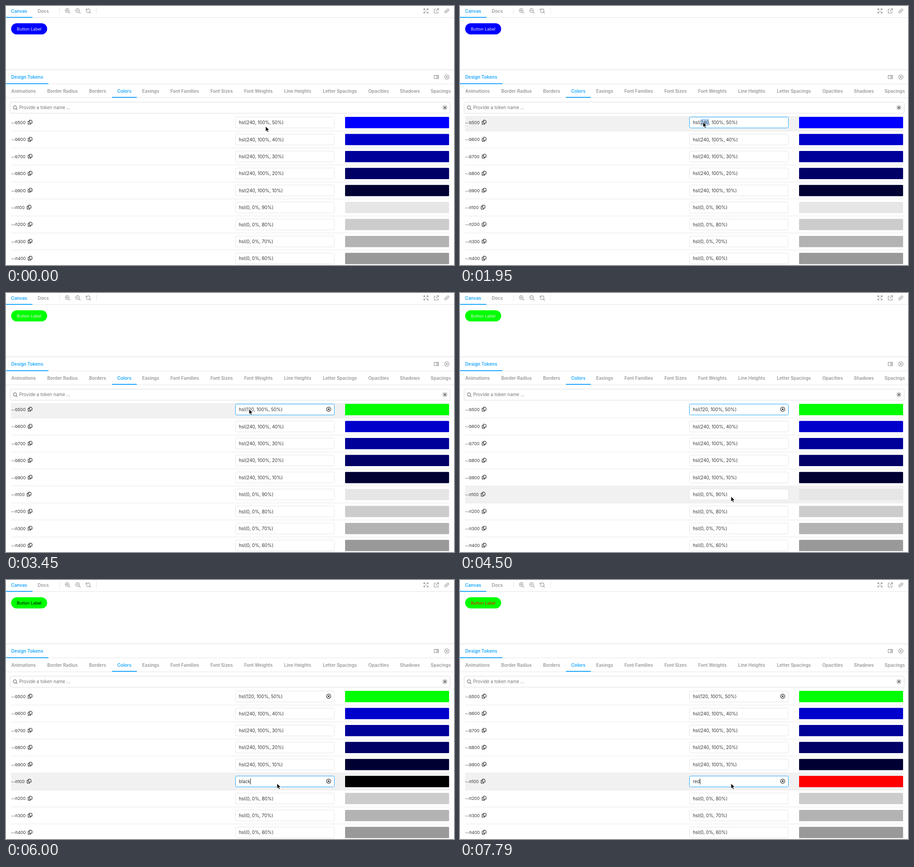
Recreate the animation shown at these times as an HTML page. Size 983 by 570 pixels, loop 8 s.

```html
<!DOCTYPE html>
<html lang="en">
<head>
<meta charset="utf-8">
<title>Design tokens</title>
<style>
html, body { margin: 0; width: 100%; height: 100%; overflow: hidden; background: #fff; }
svg { display: block; width: 983px; height: 570px; }
text { font: 9.9px Inter, "Liberation Sans", sans-serif; fill: #333; }
.tab { font-weight: 600; fill: #999; text-anchor: middle; }
.on { fill: #1ea7fd; }
.token { font-size: 9.3px; }
.label { font-size: 9.1px; text-anchor: middle; }
.icon { fill: none; stroke: #929292; stroke-width: 1.1; stroke-linecap: round; stroke-linejoin: round; }
.dark { stroke: #222; }
</style>
</head>
<body>
<svg id="stage" viewBox="0 0 983 570"></svg>
<script>
const LOOP = 8000, STEP = 150;
const ROW_H = 37.4, FIRST = 256.4, TEXT_X = 511;
const stage = document.getElementById('stage');

function add(tag, attrs, text) {
  const el = document.createElementNS('http://www.w3.org/2000/svg', tag);
  for (const k in attrs) el.setAttribute(k, attrs[k]);
  if (text !== undefined) el.textContent = text;
  stage.append(el);
  return el;
}
const rect = (x, y, width, height, fill, more) => add('rect', { x, y, width, height, fill, ...more });
const label = (x, y, str, cls) => add('text', { x, y, class: cls || '' }, str);
const icon = (x, y, d, cls = '') => add('path', { d, class: 'icon ' + cls, transform: `translate(${x} ${y})` });
const ring = r => `M${-r} 0a${r} ${r} 0 1 0 ${2 * r} 0a${r} ${r} 0 1 0 ${-2 * r} 0`;
const cross = r => `M${-r} ${-r}L${r} ${r}M${r} ${-r}L${-r} ${r}`;
const show = (el, on) => el.setAttribute('visibility', on ? 'visible' : 'hidden');
const rowY = i => FIRST + i * ROW_H;

rect(0, 0, 983, 570, '#fff');

// Toolbar
rect(0, 25, 983, 1, '#e5e5e5');
rect(0, 24, 58, 2, '#1ea7fd');
label(28.7, 14.6, 'Canvas', 'tab on');
label(81.7, 14.6, 'Docs', 'tab');
rect(117, 3, 1, 15, '#e5e5e5');
rect(198, 3, 1, 15, '#e5e5e5');
const lens = 'M-4.9 -.7a4.2 4.2 0 1 0 8.4 0a4.2 4.2 0 1 0 -8.4 0M2.4 2.4L5.2 5.2';
icon(135, 10.8, lens + 'M-2.6 -.7H1.2M-.7 -2.6V1.2');
icon(157.8, 10.8, lens + 'M-2.6 -.7H1.2');
icon(180.8, 10.8, 'M-4.4 -2.2A4.2 4.2 0 1 1 -4.7 .4M-5 -4.8V-1.8H-2M2.4 2.6L5.2 5.2');
icon(921.5, 10.8, 'M-4.7 -2V-4.7H-2M2 -4.7H4.7V-2M4.7 2V4.7H2M-2 4.7H-4.7V2' +
  'M-4.4 -4.4L-1.4 -1.4M4.4 -4.4L1.4 -1.4M4.4 4.4L1.4 1.4M-4.4 4.4L-1.4 1.4');
icon(944.3, 10.8, 'M-1 -3.8H-4.7V4.7H3.8V1M1.6 -4.9H4.9V-1.6M4.6 -4.6L-.8 .8');
icon(967.2, 10.8, 'M-1.2 1.2A2.1 2.1 0 0 1 -1.2 -1.6L1.4 -4.2A2.1 2.1 0 0 1 4.3 -1.3L2.8 .2' +
  'M1.2 -1.2A2.1 2.1 0 0 1 1.2 1.6L-1.4 4.2A2.1 2.1 0 0 1 -4.3 1.3L-2.8 -.2');

// Preview button
const button = rect(11.3, 38, 79, 24.6, '#00f', { rx: 12.3 });
const buttonText = label(50.8, 53.7, 'Button Label', 'label');

// Panel header and tabs
rect(0, 140, 983, 1, '#dcdcdc');
rect(0, 171, 983, 1, '#e5e5e5');
rect(0, 170, 93, 2, '#1ea7fd');
label(46.5, 160.2, 'Design Tokens', 'tab on');
icon(944.3, 156.3, 'M-4.8 -3.7H4.8V3.7H-4.8ZM1.2 -3.7V3.7M2.8 -1.8H3.4M2.8 0H3.4M2.8 1.8H3.4');
icon(967.2, 156.3, ring(5) + cross(1.9));
rect(0, 201.5, 983, 1, '#e5e5e5');
rect(232.5, 200, 54.5, 2, '#1ea7fd');
[['Animations', 38.5], ['Border Radius', 124], ['Borders', 201], ['Colors', 259.5],
 ['Easings', 317.5], ['Font Families', 392.2], ['Font Sizes', 473], ['Font Weights', 553.8],
 ['Line Heights', 640], ['Letter Spacings', 732.6], ['Opacities', 817.5], ['Shadows', 886.2],
 ['Spacings', 954]].forEach(([name, x]) =>
  label(x, 191, name, name === 'Colors' ? 'tab on' : 'tab'));

// Search
rect(9, 211.5, 965.5, 24.5, '#fff', { rx: 3, stroke: '#dcdcdc' });
icon(20.3, 223.8, 'M-4.3 -.6a3.6 3.6 0 1 0 7.2 0a3.6 3.6 0 1 0 -7.2 0M2 2L4.4 4.4').style.stroke = '#666';
label(29, 227.4, 'Provide a token name …').style.fill = '#777';
add('circle', { cx: 963, cy: 223.6, r: 6, fill: '#dedede' });
icon(963, 223.6, cross(2.5)).style.stroke = '#444';

// Token rows
const tokens = [];
for (let n = 5; n <= 9; n++) tokens.push(['--b' + n + '00', `hsl(240, 100%, ${100 - n * 10}%)`]);
for (let n = 1; n <= 4; n++) tokens.push(['--n' + n + '00', `hsl(0, 0%, ${100 - n * 10}%)`]);

const rows = tokens.map(([name, value], i) => {
  const y = rowY(i);
  const top = Math.max(242, y - 18.7);
  const hover = rect(11, top, 962, y + 18.7 - top, '#f1f1f1');
  rect(11, y + 18.2, 962, 1, '#e8e8e8');
  label(11.6, y + 3.5, name, 'token');
  icon(name === '--n100' ? 50.6 : 52.8, y - .6,
    'M-1.2 -4.4H2.4L4.4 -2.4V2H-1.2ZM-1.2 -2.2H-4.2V4.4H1.4V2', 'dark');
  const box = rect(503.5, y - 12, 217, 24, '#fff', { rx: 3 });
  const mark = rect(TEXT_X, y - 8.5, 0, 16, '#b3d7ff');
  const text = label(TEXT_X, y + 3.8, value);
  const caret = rect(TEXT_X, y - 6.5, 1, 13, '#222');
  const clear = icon(708, y - .6, ring(4.7) + cross(1.7), 'dark');
  const swatch = rect(744, y - 12.3, 228.2, 24.8, value, { rx: 1.5 });
  return { hover, box, mark, text, caret, clear, swatch };
});

const cursor = add('path', {
  d: 'M0 0V11.4L2.6 9L4.3 13L6.4 12.1L4.7 8.2H8.3Z',
  fill: '#000', stroke: '#fff', 'stroke-width': .9, 'stroke-linejoin': 'round'
});

// Timelines: [start, value]
const hueText = [[0, '240'], [2550, '1'], [2700, '12'], [2850, '120']];
const greyText = [[0, tokens[5][1]], [5400, 'b'], [5550, 'bl'], [5700, 'bla'], [5850, 'blac'],
  [6000, 'black'], [7190, ''], [7490, 're'], [7790, 'red']];
const focusRow = [[0, -1], [1350, 0], [4650, 5]];
const caretOn = [[0, 0], [1350, 1], [1800, 0], [2550, 1], [3450, 0], [3900, 1], [4350, 0],
  [4650, 1], [4950, 0], [5400, 1], [6590, 0], [7040, 1]];
const within = (t, a, b) => t >= a && t < b;
const at = (line, t) => line.filter(([start]) => start <= t).pop()[1];

function glide(t, start, steps) {
  const k = Math.floor((t - start) / STEP) + 1;
  const u = Math.min(1, Math.max(0, k / steps));
  return u * u * (3 - 2 * u);
}

function width(text, chars) {
  return chars ? text.getSubStringLength(0, chars) : 0;
}

function draw(t) {
  const a = glide(t, 150, 6), b = glide(t, 3750, 6);
  const x = 569.6 - 36.4 * a + 61.5 * b;
  const y = 264.8 - 9.3 * a + 192.3 * b;
  cursor.setAttribute('transform', `translate(${x} ${y})`);

  const hue = at(hueText, t), grey = at(greyText, t);
  const hueColor = `hsl(${hue}, 100%, 50%)`;
  const valid = grey.startsWith('hsl') || grey === 'black' || grey === 'red';
  const first = rows[0], sixth = rows[5];
  first.text.textContent = hueColor;
  first.swatch.setAttribute('fill', hueColor);
  sixth.text.textContent = grey;
  sixth.swatch.setAttribute('fill', valid ? grey : 'none');
  button.setAttribute('fill', hueColor);
  // An empty override falls back to the default; an invalid one inherits black.
  buttonText.style.fill = grey === '' ? tokens[5][1] : valid ? grey : 'black';

  const hovered = t < 150 ? -1 : Math.round((y - FIRST) / ROW_H);
  const focused = at(focusRow, t);
  rows.forEach((row, i) => {
    show(row.hover, i === hovered);
    row.box.setAttribute('stroke', i === focused ? '#1ea7fd' : '#e5e5e5');
    show(row.caret, i === focused && at(caretOn, t));
    show(row.clear, (i === 0 && t >= 2550) || (i === 5 && t >= 5400));
    show(row.mark, false);
  });

  const hueEnd = t < 2550 ? 5 : 4 + hue.length;
  first.caret.setAttribute('x', TEXT_X + width(first.text, hueEnd) - .3);
  sixth.caret.setAttribute('x', TEXT_X + width(sixth.text, grey.length));

  if (within(t, 1800, 2550)) {
    const from = width(first.text, 4);
    show(first.mark, true);
    first.mark.setAttribute('x', TEXT_X + from);
    first.mark.setAttribute('width', width(first.text, 7) - from);
  }
  if (within(t, 4950, 5400)) {
    show(sixth.mark, true);
    sixth.mark.setAttribute('width', width(sixth.text, grey.length));
  }
}

const began = performance.now();
function tick() {
  draw((performance.now() - began) % LOOP);
  requestAnimationFrame(tick);
}
tick();
</script>
</body>
</html>
```
